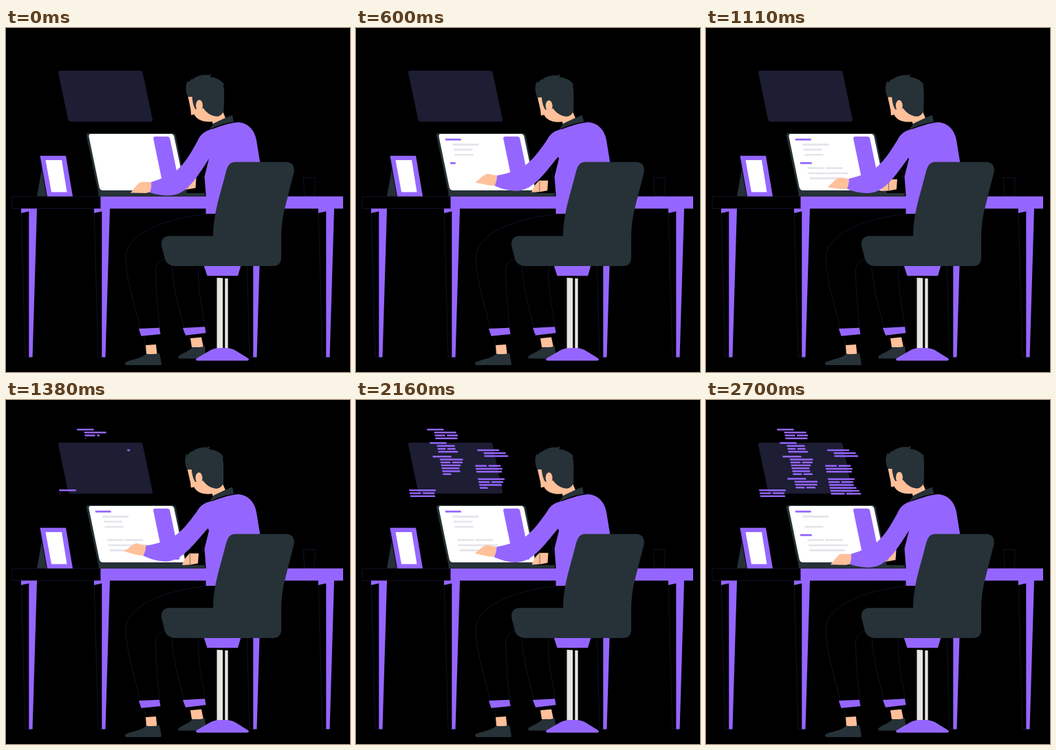
Animation, 500 px wide and 500 px high, one loop 2.73 s. Source, as an HTML page:

```html
<!DOCTYPE html>
<html lang="en">
<head>
<meta charset="utf-8">
<title>Coding at the desk</title>
<style>
  html, body { margin: 0; width: 100%; height: 100%; overflow: hidden; background: #000; }
  svg { display: block; width: 100vw; height: 100vh; }
  .p { fill: #9566ff; }
  .d { fill: #263238; }
  .s { fill: #ffc09a; }
  .w { fill: #fff; }
  .g { fill: #e6e5ec; }
  .l { fill: #e8e6e1; }
  .h { fill: none; stroke: #241e45; stroke-width: .55; }
</style>
</head>
<body>
<svg viewBox="0 0 500 500">
  <defs>
    <g id="leg">
      <path class="h" d="M22 262L28 478H34"/>
      <path class="p" d="M22 262H45L38.500 478.500H33.300V266.500L22 269Z"/>
    </g>
  </defs>

  <path fill="#1d1d33" d="M79 62H195Q198 62 198.700 65L213 133Q213.500 136 210 136H94Q91 136 90.200 133L76 65Q75.500 62 79 62Z"/>
  <g id="float"></g>

  <use href="#leg"/>
  <use href="#leg" x="106"/>
  <use href="#leg" x="326"/>
  <use href="#leg" x="432"/>
  <path class="h" d="M9 245H138V262.500H9ZM432 217.500H449.500L448 244H434Z"/>
  <path class="p" d="M137.500 244.700H490V262.500H137.500Z"/>

  <path class="d" d="M52 205L45 244.500H59Z"/>
  <path class="h" d="M48.500 188L58.500 244"/>
  <path class="p" d="M49.500 185.700H87L97 244.700H60Z"/>
  <path class="w" d="M57.500 192H81L88.500 238.500H66Z"/>

  <path class="d" d="M120 152.700H242Q246 152.700 247 157L263 240H289V244.700H134.500V240L117 157Q116.500 153 120 152.700Z"/>
  <path class="w" d="M123 154H240Q243.500 154 244.300 157.500L260 232Q260.500 236 257 236H141Q136.500 236 135.500 231L120.500 158Q120 154 123 154Z"/>
  <path class="p" d="M217 157.700H234Q237.500 157.700 238.300 161L252.500 229Q253 232 250 232H232Q229 232 228.300 229L214.200 161Q213.700 157.700 217 157.700Z"/>
  <g id="screen"></g>

  <g id="back">
    <path class="s" d="M267 223H280L279 237.500L268 239.500L256 240Q259 230 267 223Z"/>
    <path d="M267.600 224V239" stroke="#263238" stroke-width=".6"/>
  </g>
  <path class="h" d="M284 202L286.500 222"/>

  <path class="h" d="M302 269.500C230 275 172 300 174 336C176 375 190 410 195 437M235 335.500C226 336 218 341 217.500 352C218 390 222 418 223 436M241 346C243 380 253 413 259 436M284 346Q279 349 279.500 359C281 395 287 415 289 434M201 449L203 461M265 446L268 451"/>
  <path class="p" d="M193 437L223 435.700L224.500 445L196.500 447.700ZM257 436L289 434.200L290.500 443.200L261 446.700Z"/>
  <path class="s" d="M203 461L218 460L219.500 474H204ZM268 451L284 449.500L287 464H270Z"/>
  <path class="d" d="M173 487C177 482 195 482 204 473.500Q214 475 223 472.500L226 488Q226 490 223 490H176Q173 490 173 487ZM250 478C254 473 265 471 271 464Q281 465 289 462.500L291 480.500H253Q250 481 250 478Z"/>

  <g id="head">
    <path class="s" d="M298 118L315 121L319 131L301 140L299 134Z"/>
    <path class="s" d="M264 97L268.500 119L269 126.500L273.500 125.500C277 133 286 137.500 300 136L304 122L290 96Z"/>
    <path class="d" d="M264.500 100C260 92 261 82 264 76.500L265 79L270.500 73.500L271 75C277 69 287 67.500 294 68.500L298 66.700L296.500 71C306 72 313 76 318 83L315.500 82.500C318 88 317 102 316.500 121C313 127 310 128.500 306 128.500C298 128 290 122 287 116.500L275.500 118C272 113 271 106 270.500 100Z"/>
    <ellipse class="s" cx="281" cy="112.500" rx="5" ry="8"/>
  </g>

  <path class="p" d="M296 148C312 143 323 138 338 137C351 138 361 147 364 163L370 200L340 270H290.500L290.500 242L288.500 216L295 190L284 162Z"/>
  <path class="d" d="M295.500 147.500L302 138.500L318 131L329 126.500L331 136.500Q314 138.500 295.500 147.500Z"/>

  <g id="arm">
    <path id="hand" class="s" d="M214 224L196 223.700C190 227 187 233 181 239.500L203 240L212 238Z"/>
    <path class="p" d="M300 147C289 149 282 155 278 165C268 183 260 197 248 207Q234 217 211 224Q212 232 209 239C224 244 240 245 250 241C268 234 280 213 295 190L314 165Z"/>
  </g>

  <path class="p" d="M287.500 345H341.500L337 360.300H292.500Z"/>
  <path class="l" d="M306.500 363L315 363.500V467H306.500ZM318.300 364H322.600V467H318.300Z"/>
  <path class="p" d="M278 483.500Q274 482 278 479.500L296 469Q303 465 311 465H319Q327 465 334 469L351 479.500Q355 482 351 483.500Z"/>
  <path class="d" d="M332 194.700H408Q420 196 418.700 209L407 255Q400 280 400 305V335Q399 346 388 346H245Q234 345 231 336L226 316Q225 304 236 302.300H301C301 270 312 240 320 208Q323 195 332 194.700Z"/>
</svg>
<script>
const LOOP = 2730, BEAT = LOOP / 3, STEP = 30, GROW = 110;
const SLANT = .21, SPLIT = 2;
const $ = id => document.getElementById(id);

// Runs of code: blocks of rows, each block led by an outdented heading
const laptop = {
  parent: 'screen', row: 'g', x: 129.5, y: 160.7, at: 164, blocks: [4, 4], base: 42,
  vary: 16, head: .45, indent: 9, pitch: 7.4, gap: 4.6, h: 2.8, lag: 96
};
const floating = (x, y, at, blocks, base, indent = 0, head = 1) => ({
  parent: 'float', row: 'p', x, y, at, blocks, base, indent, head,
  vary: 4, pitch: 4.25, gap: 2.6, h: 2.5, lag: 67
});
const runs = [
  laptop,
  floating(77, 130, 1310, [3], 40),
  floating(103, 41.7, 1175, [4, 4, 7, 4], 30, 9.5, .85),
  floating(176, 71.7, 1365, [3], 36, 8.5),
  floating(173, 94.4, 1592, [3], 35),
  floating(177, 113.7, 1925, [6], 40)
];

const lines = [];

function addRow(run, block, row, i) {
  const n = lines.length, first = row === 0;
  const dy = run.pitch * i + run.gap * block;
  const wave = run.base + run.vary * Math.cos((n - 6) * 2 * Math.PI / 7);
  const el = document.createElementNS('http://www.w3.org/2000/svg', 'path');
  el.setAttribute('class', first ? 'p' : run.row);
  $(run.parent).append(el);
  lines.push({
    el,
    x: run.x + SLANT * dy + (first ? 0 : run.indent),
    y: run.y + dy,
    h: run.h,
    width: first ? wave * run.head : wave,
    split: n > 1 && n % 4 === 1,
    at: run.at + run.lag * i
  });
}

for (const run of runs) {
  let i = 0;
  run.blocks.forEach((size, block) => {
    for (let row = 0; row < size; row++) addRow(run, block, row, i++);
  });
}

function linePath({ x, y, h, width, split, at }, t) {
  const shown = width * Math.min(1, (t - at) / GROW);
  const bar = (from, to) => to > from
    ? `M${x + from} ${y}H${x + to - .5}l.5 ${h}H${x + from + .5}z` : '';
  if (!split) return bar(0, shown);
  const mid = width * .46;
  return bar(0, Math.min(mid, shown)) + bar(mid + SPLIT, shown);
}

// On the laptop one upper row blinks per rest, the second heading per raised hand
function blinking(t, swing) {
  if (swing < .13) return Math.round(t / BEAT) - 1;
  return swing > .8 ? laptop.blocks[0] : -1;
}

function draw(t) {
  const swing = (1 - Math.cos(2 * Math.PI * t / BEAT)) / 2;
  const rest = 1 - swing;
  $('arm').setAttribute('transform', `rotate(${7.6 * swing} 300 160)`);
  $('hand').setAttribute('transform', `rotate(${6 * swing} 210 232)`);
  $('head').setAttribute('transform', `rotate(${-1.4 * swing} 315 135)`);
  $('back').setAttribute('transform', `translate(${-3.5 * rest} ${-5 * rest})`);
  const off = blinking(t, swing);
  lines.forEach((line, n) => line.el.setAttribute('d', n === off ? '' : linePath(line, t)));
}

const t0 = performance.now();
function tick() {
  const t = (performance.now() - t0) % LOOP;
  draw(Math.floor(t / STEP) * STEP);
  requestAnimationFrame(tick);
}
tick();
</script>
</body>
</html>
```
